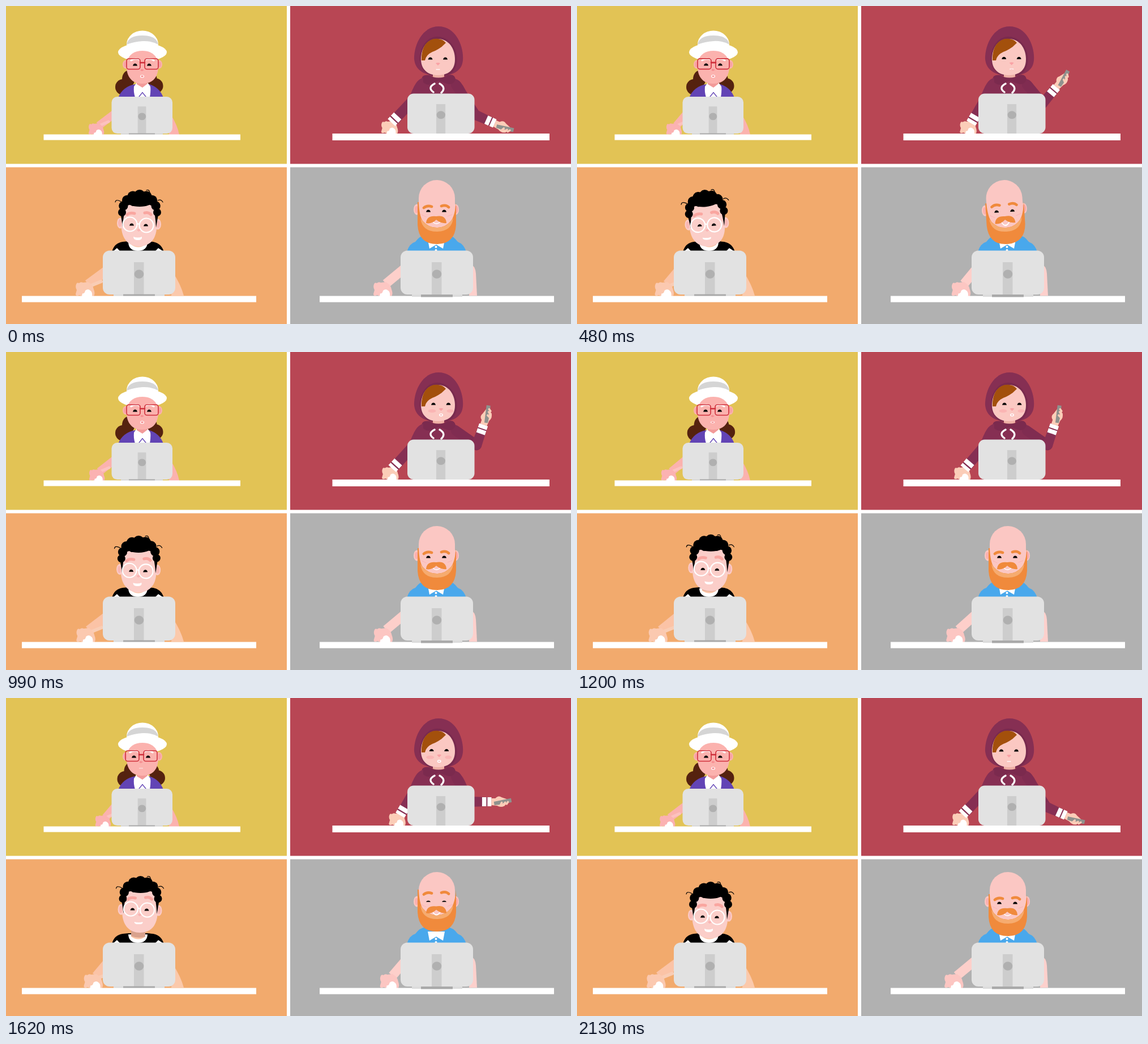
These frames come from a looping animation (998 by 561 pixels, 2160 ms). An HTML page:

```html
<!DOCTYPE html>
<html lang="en">
<head>
<meta charset="utf-8">
<title>Four people at their desks</title>
<style>
html, body { margin: 0; width: 100%; height: 100%; overflow: hidden; background: #fff; }
svg { display: block; width: 100vw; height: 100vh; }
.line { fill: none; stroke-linecap: round; stroke-linejoin: round; }
</style>
</head>
<body>
<svg viewBox="0 0 998 561">
<defs>
  <path id="eye" d="M-4 1.5Q-3 -2.5 0 -2.5T4 1.5Z" fill="#000"/>
  <g id="monitor">
    <rect width="128" height="77.5" rx="12" fill="#e2e2e2"/>
    <rect x="55" y="20.5" width="17.5" height="57" fill="#cdcdcd"/>
    <ellipse cx="64" cy="41.5" rx="8.3" ry="7.7" fill="#b0b0b0"/>
  </g>
  <g id="hand">
    <path d="M2 4Q3 0 7 2Q10 -1 14 1L23 0Q32 5 33 13Q36 20 33 25H12L8 23Q1 26 1 21L3 14Q0 9 2 4Z"/>
    <path d="M12 25L13 20Q17 21 18 15Q23 11 27 15Q31 18 30 25Z" fill="#fff"/>
  </g>
</defs>

<path d="M0 0H496V278.500H0Z" fill="#e2c355"/>
<path d="M502 0H998V278.500H502Z" fill="#b84654"/>
<path d="M0 284.500H496V561H0Z" fill="#f2aa6d"/>
<path d="M502 284.500H998V561H502Z" fill="#b1b1b1"/>

<!-- Woman with hat -->
<g>
  <g id="hair1" fill="#55220f">
    <circle cx="207" cy="143" r="14"/><ellipse cx="216" cy="129" rx="11" ry="15"/>
    <circle cx="264" cy="141" r="13.5"/><ellipse cx="258" cy="130" rx="9" ry="12"/>
  </g>
  <path d="M198 162Q206 142 228 138H253Q272 144 278 162Z" fill="#6244b5"/>
  <path d="M231 135L226 142Q225 152 228 161H254Q256 150 255 142L250 135Z" fill="#fff"/>
  <path d="M231 132H250V137L241 144L231 138Z" fill="#f29a99"/>
  <path class="line" d="M235 160L241 152.500L247 160" stroke="#6244b5" stroke-width="1.300"/>
  <path id="crown1" d="M213 68A28 24.500 0 0 1 269 68V76H213Z" fill="#fff"/>
  <g id="brim1">
    <path d="M213 68Q216 52 241 52T269 68Q256 61 241 62T213 68Z" fill="#d5d5d5"/>
    <ellipse cx="241" cy="81.500" rx="43" ry="16" fill="#fff"/>
  </g>
  <g id="face1" fill="#fbb2ae">
    <ellipse cx="211.500" cy="103" rx="5.500" ry="7.500"/><ellipse cx="270.500" cy="103" rx="5.500" ry="7.500"/>
    <ellipse cx="211" cy="103" rx="3" ry="5" fill="#f8a2a2"/><ellipse cx="271" cy="103" rx="3" ry="5" fill="#f8a2a2"/>
    <path d="M213 99Q219 79 241 79T269 99V109C268 127 258 137 241 137S214 127 213 109Z"/>
  </g>
  <g id="feat1">
    <path class="line" d="M221 96Q226 92 235 94M248 94Q256 92 261 96" stroke="#fff" stroke-width="3"/>
    <g id="eyes1" data-pivot="240 105"><use href="#eye" x="228" y="104"/><use href="#eye" x="253" y="104"/></g>
    <g class="line" stroke="#cf2f3b" stroke-width="1.600">
      <rect x="213" y="93" width="24" height="18.500" rx="4"/><rect x="245" y="93" width="24" height="18.500" rx="4"/>
      <path d="M237 100H245" stroke-width="2.600"/>
    </g>
    <path d="M237 113L240 111L244 113L240 115Z" fill="#f58d90"/>
    <ellipse id="mouth1" data-pivot="240 124" cx="240.500" cy="124" rx="3" ry="2" fill="#f58d90" stroke="#fff" stroke-width="1.200"/>
  </g>
  <path d="M290 190Q303 210 306 227H288Z" fill="#fbb2ae"/>
  <line id="arm1" x1="197" y1="186" x2="164" y2="211" stroke="#fbb2ae" stroke-width="14"/>
  <line id="tone1" x1="181" y1="204" x2="167" y2="210" class="line" stroke="#fcc2bf" stroke-width="5"/>
  <g id="hand1" fill="#fbb2b2"><use href="#hand" transform="translate(145 207) scale(.82)"/></g>
  <path d="M203 224H277V227H203Z" fill="#d2d2d2"/>
  <use href="#monitor" transform="translate(186.500 160) scale(.84)"/>
  <path d="M217 224.500H263V227H217Z" fill="#a9a9a9"/>
  <path d="M66.500 226.500H414V236.500H66.500Z" fill="#fff"/>
</g>

<!-- Hooded person with phone -->
<g>
  <path d="M716 158Q722 130 737 127H790Q806 130 815 158Z" fill="#862f53"/>
  <line id="upper" class="line" x1="795" y1="139" x2="829" y2="191" stroke="#802c51" stroke-width="18"/>
  <g id="forearm">
    <path d="M-30 -9L2 -8V8L-30 9Q-37 7 -37 0T-30 -9Z" fill="#862f53"/>
    <path d="M8 -6L15 -6Q20 -12 26 -8L35 -5Q38 -1 35 3L31 7Q25 11 18 7L8 6Z" fill="#fbcdb8"/>
    <g transform="translate(28 0) rotate(-11)">
      <path d="M-15.500 -3L15.500 -3.500V3.500L4 4L2 2L-5 4L-15.500 3Z" fill="#8f928e"/>
      <path class="line" d="M-5 5L-2 1M1 6L4 2M6 5L9 2" stroke="#fbcdb8" stroke-width="3.500"/>
    </g>
    <path d="M-8.500 -8H-1V8H-8.500ZM1 -8H8V8H1Z" fill="#fff"/>
  </g>
  <path d="M764 36C795 36 809 72 807 96C805 116 788 123 764 123S723 114 721 94C720 70 735 36 764 36Z" fill="#862f53"/>
  <path d="M762 54C786 54 800 80 796 102Q791 125 764 125T731 98C729 76 742 54 762 54Z" fill="#792a4e"/>
  <path d="M734 130Q734 120 748 122L756 126H772L780 122Q793 119 794 130Q789 141 779 137L764 132L750 139Q739 140 734 130Z" fill="#7b2a4e"/>
  <path d="M754 118H774V125Q764 128 754 125Z" fill="#eeb0a5"/>
  <path d="M762 58C783 58 793 76 793 94C793 113 781 122 763 122S733 112 733 94C733 74 744 58 762 58Z" fill="#fbc8c2"/>
  <path d="M734 96Q733 65 755 58Q770 56 777 65Q767 76 753 81Q742 86 740 96Z" fill="#a3500c"/>
  <g id="feat2">
    <g id="cheeks2" fill="#fab0b0"><ellipse cx="747" cy="105" rx="7" ry="3"/><ellipse cx="779" cy="105" rx="6" ry="3"/></g>
    <use href="#eye" x="749.500" y="93"/><use href="#eye" x="776" y="93"/>
    <path d="M759 101Q763 99 767 101L763 105Z" fill="#f9a2a5"/>
    <ellipse id="mouth2" data-pivot="763 112" cx="763" cy="112" rx="3" ry="1" fill="#f58d90" stroke="#fff" stroke-width="1.200"/>
  </g>
  <path class="line" d="M757 137Q744 144 755 152M766 137Q778 144 769 153" stroke="#fff" stroke-width="3.300"/>
  <path d="M737 127Q724 128 712 163L725 172L736 155Z" fill="#862f53"/>
  <line id="arm2" class="line" x1="722" y1="163" x2="687" y2="200" stroke="#862f53" stroke-width="18"/>
  <g id="hand2" fill="#fbcdb8"><use href="#hand" transform="translate(662 203) scale(.88)"/></g>
  <g id="cuff2"><path d="M-7 -9H1V9H-7ZM3 -9H9V9H3Z" fill="#fff"/><path d="M1 -9H3V9H1Z" fill="#862f53"/></g>
  <use href="#monitor" transform="translate(709 154.500) scale(.926 .91)"/>
  <path d="M576.500 225H960V237H576.500Z" fill="#fff"/>
</g>

<!-- Curly hair -->
<g>
  <path d="M187 434Q191 418 206 416L216 415H250L260 416Q275 419 279 434Z" fill="#000"/>
  <path d="M189 433L196 427L203 434ZM262 434L269 427L278 433Z" fill="#fff"/>
  <path d="M216 417Q217 432 233 432T250 417Z" fill="#fff"/>
  <path d="M221 410H246V421Q234 430 221 421Z" fill="#fbc6a8"/>
  <path d="M221 410H246V421Q234 425 221 420Z" fill="#d9a28d"/>
  <g id="head3" data-pivot="235 424">
    <ellipse cx="202" cy="383" rx="6" ry="9.500" fill="#fbccc8"/><ellipse cx="268" cy="385" rx="6" ry="9.500" fill="#fbccc8"/>
    <ellipse cx="201" cy="383" rx="3" ry="6.500" fill="#f9b7b3"/><ellipse cx="269" cy="385" rx="3" ry="6.500" fill="#f9b7b3"/>
    <path d="M204 364Q209 342 235 342T267 364L266 393C264 414 252 424 235 424S206 413 204 393Z" fill="#fbcec9"/>
    <path d="M202 362L212 356Q207 370 206 390ZM259 352L270 362L265 391Q264 368 259 352Z"/>
    <ellipse cx="236" cy="344" rx="24" ry="10"/>
    <g id="curls3"></g>
    <path class="line" d="M193 346Q194 340 203 345M248 325Q254 323 254 331M268 343Q274 340 277 346M222 352Q230 353 231 349" stroke="#000" stroke-width="1.200"/>
    <g id="feat3">
      <path class="line" d="M214 368Q219 364 227 366M245 365Q252 363 256 368" stroke="#f9a6a0" stroke-width="5"/>
      <g id="eyes3" data-pivot="235 387"><use href="#eye" x="222" y="386"/><use href="#eye" x="247" y="387"/></g>
      <g class="line" stroke="#fff" stroke-width="2.200">
        <circle cx="219" cy="385" r="12.500"/><circle cx="248" cy="387" r="12.500"/><path d="M231.500 385Q234 383 235.500 386"/>
      </g>
      <path d="M231 395L235 393L238 396L234 398Z" fill="#fab4b3"/>
      <path id="mouth3" data-pivot="233 410" d="M225 407Q233 410 240 407Q241 413 233 413T225 407Z" fill="#fff"/>
    </g>
  </g>
  <path d="M295 470Q309 492 314 511H292Z" fill="#fbc9ab"/>
  <line id="arm3" x1="183" y1="463" x2="145" y2="491" stroke="#fbc3a6" stroke-width="17"/>
  <line id="tone3" x1="168" y1="486" x2="148" y2="494" class="line" stroke="#f9cdb5" stroke-width="6"/>
  <g id="hand3" fill="#fbc9b0"><use href="#hand" transform="translate(122 487)"/></g>
  <path d="M190 508.500H280V512H190Z" fill="#dcdcdc"/>
  <use href="#monitor" x="171" y="431.500"/>
  <path d="M207 508.500H263V512H207Z" fill="#a9a9a9"/>
  <path d="M28 511.500H442V522.500H28Z" fill="#fff"/>
</g>

<!-- Bearded man -->
<g>
  <path d="M708 434Q712 419 723 416Q731 405 742 404H779Q790 405 798 416Q809 420 813 434Z" fill="#49a8ec"/>
  <path d="M745 412L748 428L760 421L772 428L775 412Z" fill="#fff"/>
  <circle cx="759.500" cy="425" r="2" fill="#fff"/><circle cx="759.500" cy="431" r="2" fill="#fff"/>
  <g id="head4" data-pivot="760 420">
    <ellipse cx="726" cy="359" rx="6" ry="9.500" fill="#fbc7c3"/><ellipse cx="794" cy="359" rx="6" ry="9.500" fill="#fbc7c3"/>
    <ellipse cx="725" cy="359" rx="3" ry="6.500" fill="#fab0af"/><ellipse cx="795" cy="359" rx="3.500" ry="7" fill="#f9a9a8"/>
    <rect x="729" y="307" width="64" height="98" rx="32" fill="#fbc7c3"/>
    <g id="beard4">
      <path d="M727 346V386Q729 420 761 420T795 386V346Q793 370 786 379Q776 391 761 391T736 379Q730 370 729 346Z" fill="#f08a3c"/>
      <path d="M732 374Q743 391 761 391T790 374Q787 398 761 398T732 374Z" fill="#f6ab6f"/>
    </g>
    <g id="feat4">
      <path id="brows4" class="line" d="M738 356Q744 351 752 354M769 353Q777 350 782 355" stroke="#f08a3c" stroke-width="4.600"/>
      <g id="eyes4" data-pivot="760 363"><use href="#eye" x="746" y="362"/><use href="#eye" x="774" y="362"/></g>
      <path class="line" d="M734 368L742 372M780 371L788 368" stroke="#f9aeb0" stroke-width=".800"/>
      <path id="mouth4" data-pivot="760 380" class="line" d="M754 381Q760 387 767 381" stroke="#fff" stroke-width="1.300"/>
      <path d="M742 383Q743 369 760 371Q777 368 778 383Q768 384 760 377Q752 385 742 383Z" fill="#f08a3c"/>
    </g>
  </g>
  <path d="M820 455Q829 458 830 472L832 511H818Z" fill="#fdd0cc"/>
  <line id="arm4" x1="711" y1="457" x2="671" y2="490" stroke="#fdcfca" stroke-width="16.500"/>
  <g id="hand4" fill="#fcc6c2"><use href="#hand" transform="translate(648 487)"/></g>
  <use href="#monitor" x="697" y="431.500"/>
  <path d="M554 511.500H968V522.500H554Z" fill="#fff"/>
  <path d="M717 509H806V513H717Z" fill="#dcdcdc"/>
  <path d="M733 509H789V513.500H733Z" fill="#a9a9a9"/>
</g>
</svg>

<script>
const LOOP = 2160, STEP = 30, SWEEP = LOOP / 2;
const $ = id => document.getElementById(id);

const smooth = u => {
  u = Math.min(1, Math.max(0, u));
  return u * u * (3 - 2 * u);
};
// Eases from 0 to 1 between a and b, and back to 0 between c and d
const pulse = (t, a, b, c, d) => smooth((t - a) / (b - a)) * smooth((d - t) / (d - c));

function pose(id, { x = 0, y = 0, turn = 0, tall = 1 }) {
  const el = $(id), [px, py] = (el.dataset.pivot || '0 0').split(' ').map(Number);
  el.setAttribute('transform',
    `translate(${px + x} ${py + y}) rotate(${turn}) scale(1 ${tall}) translate(${-px} ${-py})`);
}

// Curls follow an arch over the forehead, largest at the top.
for (let i = 0; i <= 8; i++) {
  const a = Math.PI * i / 8, up = Math.sin(a);
  $('curls3').innerHTML +=
    `<circle cx="${236 - 31 * Math.cos(a)}" cy="${364 - 30 * up}" r="${7 + 3 * up}"/>`;
}

function moveMouse(n, t, reach, back) {
  const p = t % SWEEP / SWEEP;
  const x = reach * smooth(p / .35) * smooth((1 - p) / back);
  const arm = $('arm' + n);
  arm.dataset.wrist ??= arm.getAttribute('x2');
  arm.setAttribute('x2', +arm.dataset.wrist + x);
  pose('hand' + n, { x });
  if ($('tone' + n)) pose('tone' + n, { x });
  return x;
}

function drawWoman(t) {
  const nod = pulse(t, 60, 250, 300, 500);
  const glance = pulse(t, 1080, 1330, 1640, 1900);
  const blink = pulse(t, 600, 680, 700, 780);
  pose('crown1', { y: -1.5 * nod });
  pose('brim1', { y: -4 * nod });
  pose('face1', { y: -2 * nod });
  pose('feat1', { x: -2 * glance, y: -6 * nod });
  pose('hair1', { x: 3.5 * glance });
  pose('eyes1', { tall: 1 - .5 * blink });
  pose('mouth1', { tall: 1 - .75 * glance });
  moveMouse(1, t, 11.8, .45);
}

function drawHooded(t) {
  const gaze = pulse(t, 100, 600, 1380, 1800);
  const blush = pulse(t, 650, 950, 1650, 1950);
  pose('feat2', { x: 5.5 * gaze, y: -gaze });
  pose('mouth2', { tall: .6 + blush });
  $('cheeks2').setAttribute('opacity', .8 * blush);

  const lift = pulse(t, 0, 690, 1280, 1785), turn = 24 - 95 * lift;
  const x = 841 + 15 * (1 - lift) ** 2, y = 204 - 68 * lift ** .85;
  const angle = turn * Math.PI / 180;
  pose('forearm', { x, y, turn });
  $('upper').setAttribute('x2', x - 30 * Math.cos(angle));
  $('upper').setAttribute('y2', y - 30 * Math.sin(angle));

  const wrist = 687 + moveMouse(2, t, 13.5, .45);
  pose('cuff2', { x: wrist, y: 199, turn: Math.atan2(37, wrist - 722) * 180 / Math.PI });
}

function drawCurly(t) {
  const tilt = pulse(t, 0, 600, 700, 1080);
  const rise = pulse(t, 1050, 1550, 1650, 2100);
  pose('head3', { x: 1.5 * rise - 2 * tilt, y: -10 * rise, turn: -6 * tilt });
  pose('feat3', { y: -3 * rise });
  pose('eyes3', { tall: 1 - .3 * pulse(t, 1200, 1360, 1400, 1550) });
  pose('mouth3', { tall: 1 - .45 * pulse(t, 100, 250, 300, 700) - .3 * rise });
  moveMouse(3, t, 14.5, .45);
}

function drawBearded(t) {
  const tilt = pulse(t, 60, 260, 300, 850);
  const look = pulse(t, 500, 670, 700, 900);
  const rise = pulse(t, 1400, 1600, 1650, 1900);
  pose('head4', { x: -1.5 * tilt, turn: -5 * tilt });
  pose('beard4', { y: -8 * rise });
  pose('feat4', { x: -2 * look, y: -3.5 * rise });
  pose('brows4', { y: -4 * tilt - 6 * rise });
  pose('eyes4', { tall: 1 - .4 * rise });
  pose('mouth4', { tall: 1 + tilt + .5 * rise });
  moveMouse(4, t, 13.5, .65);
}

const start = performance.now();
function tick() {
  const t = Math.floor((performance.now() - start) % LOOP / STEP) * STEP;
  for (const draw of [drawWoman, drawHooded, drawCurly, drawBearded]) draw(t);
  requestAnimationFrame(tick);
}
tick();
</script>
</body>
</html>
```
